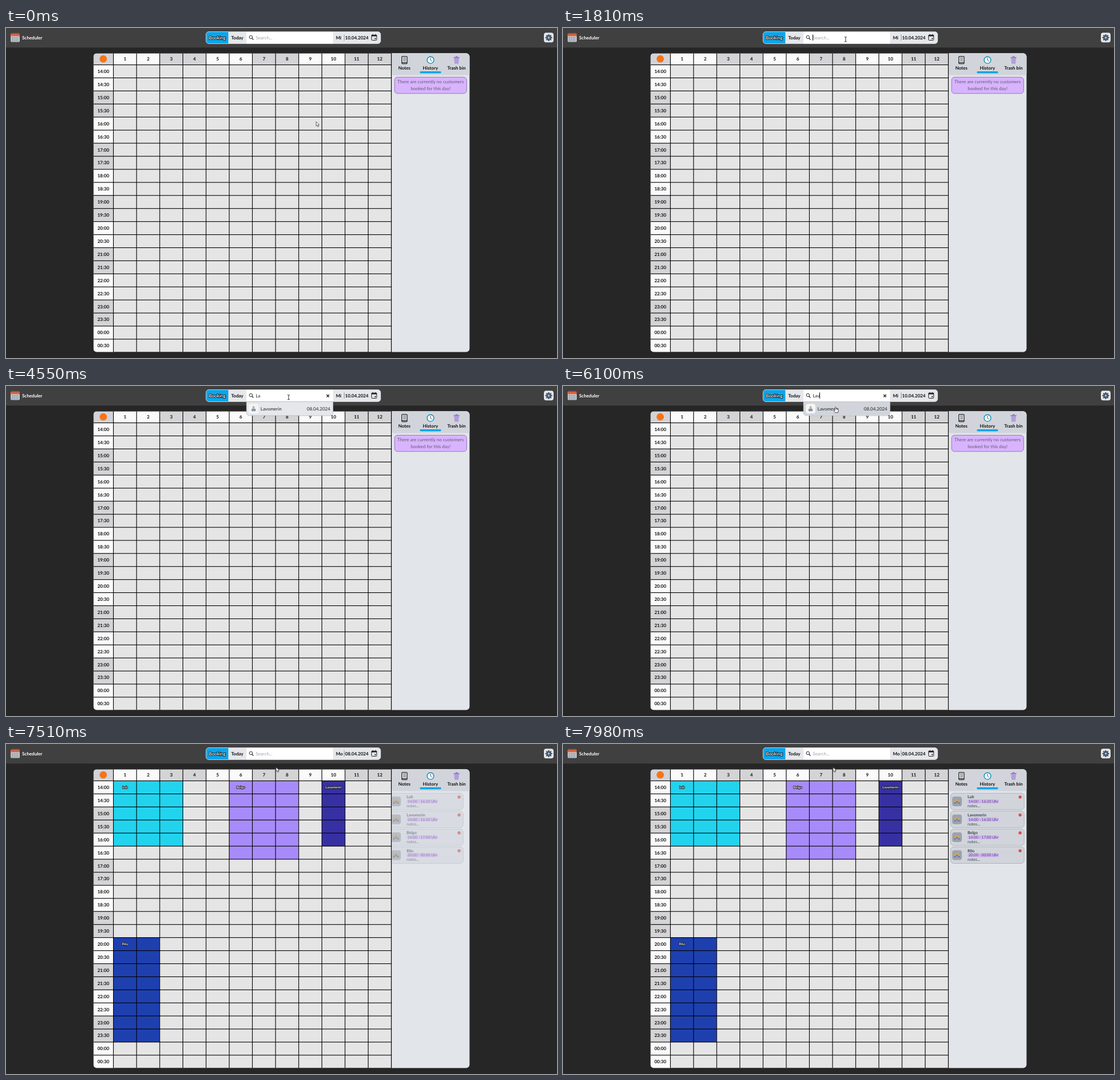
Write an HTML page with a canvas that moves like this. It is 967 px wide and 579 px high and loops after 8000 ms.

```html
<!DOCTYPE html>
<html lang="en">
<head>
<meta charset="utf-8">
<title>Scheduler</title>
<style>
  html, body { margin: 0; width: 100%; height: 100%; overflow: hidden; background: #262626; }
  canvas { display: block; }
</style>
</head>
<body>
<canvas id="stage" width="967" height="579"></canvas>
<script>
const ctx = document.getElementById('stage').getContext('2d');
ctx.textRendering = 'geometricPrecision';
ctx.lineJoin = 'round';

const LOOP = 8000, LOADED = 7290;
const BLUE = '#0ea5e9', INK = '#111';
const GRID = { x: 188.5, y: 64.6, w: 40.65, h: 22.92, left: 153.5, top: 44.5, right: 676.5, bottom: 568.5 };
const CLIENTS = { a: 'Lub', b: 'Lavomerin', c: 'Belgo', d: 'Rilo' };
// name, first column, columns, first row, rows, colour
const BOOKINGS = [
  [CLIENTS.a, 0, 3, 0, 5, '#22d3ee'],
  [CLIENTS.c, 5, 3, 0, 6, '#a78bfa'],
  [CLIENTS.b, 9, 1, 0, 5, '#3730a3'],
  [CLIENTS.d, 0, 2, 12, 8, '#1e40af']
];
const CARDS = [
  [CLIENTS.a, '14:00 - 16:30 Uhr'],
  [CLIENTS.b, '14:00 - 16:30 Uhr'],
  [CLIENTS.c, '14:00 - 17:00 Uhr'],
  [CLIENTS.d, '20:00 - 00:00 Uhr']
];
// intervals in which the text caret shows
const CARET = [[1750, 2260], [2710, 3240], [3750, 4550], [5070, 5570], [5660, 6170], [6690, 7110]];

const clamp = v => Math.max(0, Math.min(1, v));
const phase = (t, from, to) => clamp((t - from) / (to - from));
const easeOut = u => 1 - (1 - u) ** 2;
const easeInOut = u => u * u * (3 - 2 * u);
const mix = (a, b, u) => a + (b - a) * u;

function box(x, y, w, h, r, fill, stroke, width = 1) {
  ctx.beginPath();
  ctx.roundRect(x, y, w, h, r);
  paint(fill, stroke, width);
}
function disc(x, y, r, fill, stroke, width = 1) {
  ctx.beginPath();
  ctx.arc(x, y, r, 0, 7);
  paint(fill, stroke, width);
}
function shape(d, x, y, fill, stroke, width = 1) {
  ctx.save();
  ctx.translate(x, y);
  const path = new Path2D(d);
  ctx.lineWidth = width;
  if (fill) { ctx.fillStyle = fill; ctx.fill(path); }
  if (stroke) { ctx.strokeStyle = stroke; ctx.stroke(path); }
  ctx.restore();
}
function paint(fill, stroke, width) {
  if (fill) { ctx.fillStyle = fill; ctx.fill(); }
  if (stroke) { ctx.strokeStyle = stroke; ctx.lineWidth = width; ctx.stroke(); }
}
function text(s, x, y, { size = 8.06, bold = false, color = INK, align = 'left', outline = 0 } = {}) {
  ctx.font = `${bold ? 700 : 400} ${size}px Lato, sans-serif`;
  ctx.textAlign = align;
  if (outline) {
    ctx.strokeStyle = '#000';
    ctx.lineWidth = outline;
    ctx.strokeText(s, x, y);
  }
  ctx.fillStyle = color;
  ctx.fillText(s, x, y);
}

function calendarIcon() {
  box(8.3, 10, 15.7, 14.6, 1.5, '#cbd5dc');
  box(8.3, 9.6, 15.7, 4.8, [1.5, 1.5, 0, 0], '#e8603c');
  for (let i = 0; i < 4; i++) box(10 + i * 3.6, 8, 1.3, 3.6, 0.6, '#7d5a50');
  for (let r = 0; r < 3; r++)
    for (let c = 0; c < 4; c++) box(10 + c * 3.3, 15.9 + r * 2.8, 2.2, 1.8, 0, '#7c8b96');
}

function gear() {
  box(944, 8.3, 17, 17, 4, '#e5e7eb');
  for (let i = 0; i < 8; i++) {
    ctx.save();
    ctx.translate(952.5, 16.9);
    ctx.rotate(i * Math.PI / 4);
    box(-1.2, -6, 2.4, 3, 0.5, '#475569');
    ctx.restore();
  }
  disc(952.5, 16.9, 4.4, '#475569');
  disc(952.5, 16.9, 1.8, '#9cc3dd');
}

function header(t) {
  const loaded = t >= LOADED;
  ctx.fillStyle = '#404040';
  ctx.fillRect(0, 0, 967, 34.3);
  calendarIcon();
  text('Scheduler', 28.2, 19.9, { bold: true, color: '#fff' });
  gear();

  box(351, 6.5, 306.5, 21, 5, '#e5e7eb', '#d4d7dc', 0.8);
  box(351.5, 7, 38.7, 20, [4.5, 0, 0, 4.5], BLUE);
  text('Booking', 370.8, 19.8, { bold: true, color: '#fff', align: 'center', outline: 1.5 });
  text('Today', 405.8, 19.8, { bold: true, align: 'center' });

  box(422, 6.7, 152, 20.6, 0, '#fff');
  disc(429.8, 16, 2.7, null, '#222', 1);
  shape('M0 0L2.6 2.7', 431.7, 18, null, '#222', 1.2);
  const typed = loaded ? 0 : [2710, 4040, 5660].filter(at => t >= at).length;
  if (typed) text(CLIENTS.b.slice(0, typed), 438.2, 19.6, { color: '#222' });
  else text('Search...', 438.2, 19.6, { color: '#9ca3af' });
  if (CARET.some(([on, off]) => t >= on && t < off)) {
    ctx.fillStyle = '#000';
    ctx.fillRect(438 + [0, 4, 8, 12][typed], 11.5, 1, 10.5);
  }
  if (typed && t < 7110) shape('M-2.2 -2.2L2.2 2.2M2.2 -2.2L-2.2 2.2', 564.9, 17.2, null, '#222', 1.4);

  text(loaded ? 'Mo' : 'Mi', 579, 19.8, { bold: true });
  ctx.fillStyle = '#777';
  ctx.fillRect(593.2, 11.5, 0.8, 10.5);
  text(loaded ? '08.04.2024' : '10.04.2024', 595, 19.8, { bold: true });
  box(641.6, 12.3, 9, 9.2, 1, null, '#222', 1);
  ctx.fillStyle = '#222';
  ctx.fillRect(641.6, 12, 9, 2.6);
  ctx.fillRect(643.2, 10.8, 1, 2);
  ctx.fillRect(648, 10.8, 1, 2);
  ctx.fillRect(647, 17.6, 2, 2);
}

function table(loaded) {
  const g = GRID;
  const shade = i => Math.floor(i / 2) % 2 ? '#d4d4d6' : '#fafafa';
  ctx.fillStyle = '#e5e5e5';
  ctx.fillRect(g.x, g.y, g.right - g.x, g.bottom - g.y);
  ctx.fillStyle = '#d1d3d8';
  ctx.fillRect(g.left, g.top, 35, 20.1);
  disc(170.7, 54.2, 6.4, '#f97316');

  for (let c = 0; c < 12; c++) {
    const x = g.x + c * g.w;
    ctx.fillStyle = shade(c);
    ctx.fillRect(x, g.top, g.w, g.y - g.top);
    text(c + 1, x + g.w / 2, 57.4, { bold: true, align: 'center' });
  }
  for (let r = 0; r < 22; r++) {
    const y = g.y + r * g.h;
    const hour = String((14 + (r >> 1)) % 24).padStart(2, '0');
    ctx.fillStyle = shade(r);
    ctx.fillRect(g.left, y, g.x - g.left, g.h);
    text(`${hour}:${r % 2 ? '30' : '00'}`, 170.8, y + 14.4, { bold: true, align: 'center' });
  }
  if (loaded) for (const [, c, cols, r, rows, color] of BOOKINGS) {
    ctx.fillStyle = color;
    ctx.fillRect(g.x + c * g.w, g.y + r * g.h, cols * g.w, rows * g.h);
  }
  ctx.fillStyle = '#000';
  for (let c = 0; c <= 12; c++) ctx.fillRect(g.x + c * g.w - 0.55, g.top, 1.1, g.bottom - g.top);
  for (let r = 0; r < 22; r++) ctx.fillRect(g.left, g.y + r * g.h - 0.55, g.right - g.left, 1.1);
  if (loaded) for (const [name, c, , r] of BOOKINGS)
    text(name, g.x + (c + 0.5) * g.w, g.y + r * g.h + 13.5,
      { size: 6.05, bold: true, color: '#fff', align: 'center', outline: 1.3 });
}

function tabs() {
  ctx.fillStyle = '#e2e6eb';
  ctx.fillRect(677, 44, 137, 525);
  box(677, 44, 137, 38.8, [0, 0, 4, 4], '#d1d5db');

  box(694.6, 49.8, 9.4, 12.8, 1.2, '#d9dce0', '#222', 1.2);
  ctx.fillStyle = '#222';
  ctx.fillRect(694.6, 60, 9.4, 1.2);
  for (let i = 0; i < 3; i++) ctx.fillRect(697, 52.5 + i * 2.2, 5, 0.6);

  disc(745, 56.2, 5.9, '#f8fafc', '#0e8fb0', 1.4);
  shape('M0 -3.8V0L2.4 2.3', 745, 56.2, null, '#334155', 0.9);

  shape('M-4.3 -3.5H4.3L3.5 6.2H-3.5Z', 790.7, 56.5, '#b39ddb');
  box(785.5, 51, 10.4, 1.7, 0.6, '#9575cd');
  box(788.8, 49.4, 3.8, 1.8, 0.6, '#9575cd');

  const label = { bold: true, align: 'center' };
  text('Notes', 699.2, 73.2, label);
  text('History', 744.9, 73.2, label);
  text('Trash bin', 790.6, 73.2, label);
  box(726.2, 76, 37.6, 3.6, 1.8, BLUE);
}

function notice() {
  box(682, 86.3, 126.4, 28.6, 5, '#d8b4fe', '#8b6fb0', 0.9);
  const style = { color: '#655c78', align: 'center' };
  text('There are currently no customers', 745.1, 97.4, style);
  text('booked for this day!', 745.1, 109.4, style);
}

function card([name, time], y) {
  box(680.5, y, 128.8, 29, 5, '#d1d5db', '#a5abb5', 0.8);
  box(683, y + 6, 17, 17, 4, '#9ca3af');
  for (const [dx, dy] of [[-3.5, 0.6], [0, -1.4], [3.5, 0.6]]) {
    disc(691.5 + dx, y + 13.5 + dy, 1.6, '#e5a244');
    box(689.7 + dx, y + 15.2 + dy, 3.6, 2.6, [1.5, 1.5, 0, 0], '#6f7f92');
  }
  text(name, 710, y + 9, { size: 7.05, bold: true, color: '#374151' });
  box(710, y + 10.8, 55, 7.4, 3, '#d3b6f5');
  text(time, 711.8, y + 16.8, { size: 6.6, color: '#4b4560' });
  text('notes...', 710, y + 24.8, { size: 7.05, color: '#374151' });
  disc(802.2, y + 6.8, 2.6, '#dc4f4f', '#c96a6a', 0.5);
}

function cards(t) {
  const u = easeOut(phase(t, LOADED, 7990));
  ctx.save();
  ctx.beginPath();
  ctx.rect(677.2, 83, 136.8, 485);
  ctx.clip();
  ctx.globalAlpha = u;
  ctx.translate(-15 * (1 - u), 0);
  CARDS.forEach((c, i) => card(c, 86.3 + i * 31.4));
  ctx.restore();
}

function results(t, hover) {
  if (t < 2710 || t >= LOADED) return;
  const names = t < 4040 ? [CLIENTS.b, CLIENTS.a] : [CLIENTS.b];
  const rowH = 24.6, h = rowH * names.length;
  box(422, 27.4, 152, h, [0, 0, 5, 5], '#e5e7eb', '#a3a5aa', 0.6);
  names.forEach((name, i) => {
    const y = 27.4 + i * rowH;
    if (hover) box(422, y, 152, rowH, [0, 0, 5, 5], '#d1d5db');
    box(426, y + 3.8, 17, 17, 4, '#f3f4f6');
    disc(434.5, y + 9.8, 2, '#d9ad6a');
    box(430.8, y + 12.2, 7.4, 4.6, [2, 2, 1, 1], '#8296ab');
    text(name, 446.8, y + 15.3, { color: '#222' });
    text('08.04.2024', 569.2, y + 15.3, { color: '#222', align: 'right' });
  });
}

function pointer(t) {
  const a = easeInOut(phase(t, 1090, 1810)), b = easeOut(phase(t, 5920, 6250));
  return { x: mix(mix(544.3, 496, a), 474, b), y: mix(mix(164.3, 19.8, a), 40.6, b) };
}

function cursor(t, { x, y }, hover) {
  if (hover && t < 7110)
    shape('M-1 1Q0 -.7 1 1V4L4.3 5Q5 5.3 4.8 6.5L4 10.3H-.8L-3 7Q-3.4 5.6 -1 6.4Z', x, y, '#fff', '#222', 0.8);
  else if (y < 27.4)
    shape('M-2 -4.2Q0 -4.2 0 -3.2Q0 -4.2 2 -4.2M0 -3.2V3.2M-2 4.2Q0 4.2 0 3.2Q0 4.2 2 4.2', x, y, null, '#111', 0.9);
  else
    shape('M0 0V7.8L1.8 6.2L3.1 9L4.4 8.4L3.2 5.7H5.5Z', x, y, '#fff', '#222', 0.7);
}

function draw(t) {
  const loaded = t >= LOADED, p = pointer(t);
  const hover = !loaded && t > 5900 && p.y > 27.4;
  ctx.fillStyle = '#262626';
  ctx.fillRect(0, 0, 967, 579);
  ctx.save();
  ctx.beginPath();
  ctx.roundRect(153.3, 44.3, 660.2, 524.2, 6);
  ctx.clip();
  tabs();
  table(loaded);
  if (loaded) cards(t); else notice();
  ctx.restore();
  header(t);
  results(t, hover);
  cursor(t, p, hover);
}

const start = performance.now();
function tick() {
  draw((performance.now() - start) % LOOP);
  requestAnimationFrame(tick);
}
tick();
</script>
</body>
</html>
```
